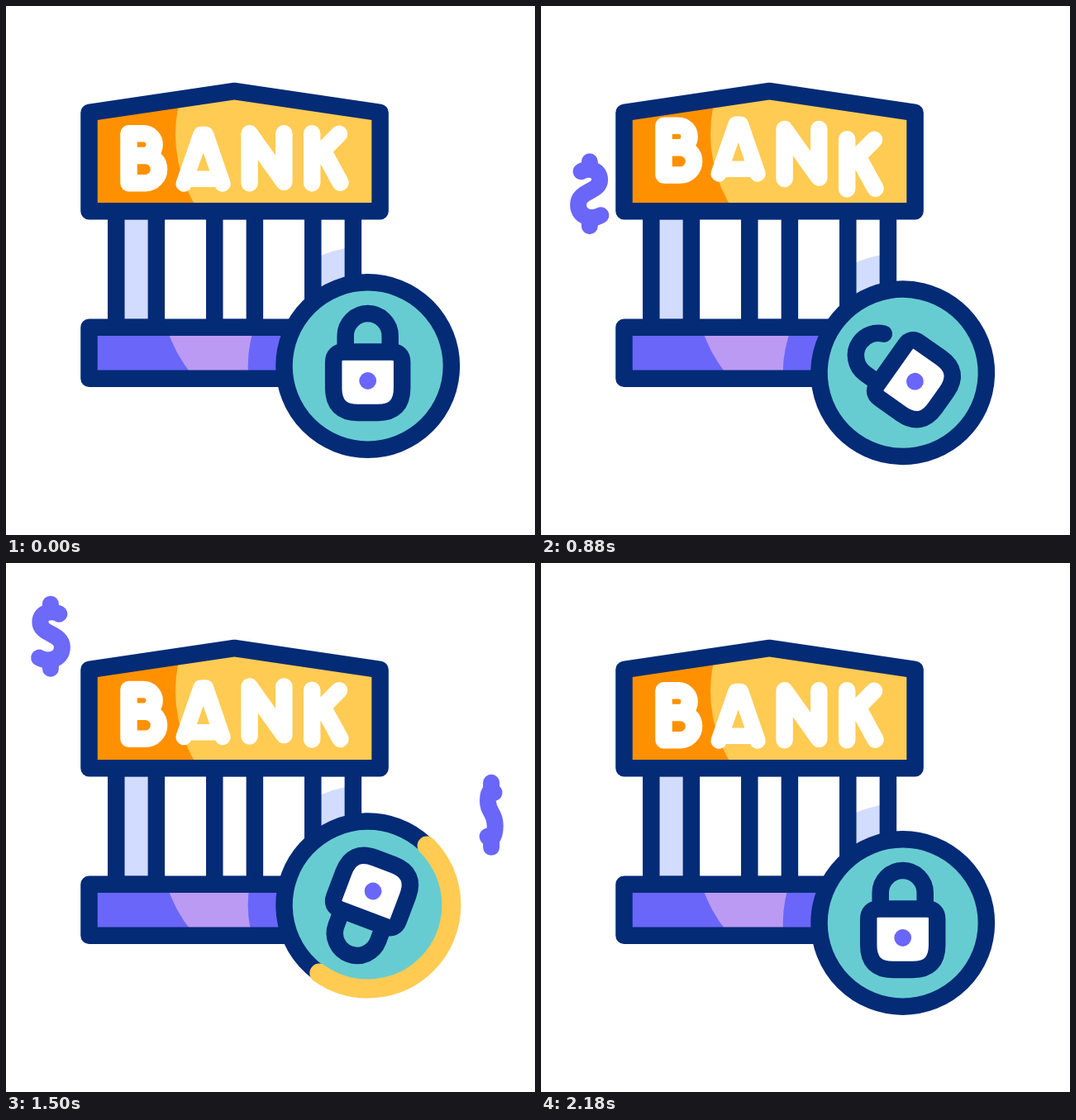
Write an HTML page with a canvas that moves like this. It is 640 px wide and 640 px high and loops after 2.4 s.

```html
<!DOCTYPE html>
<html lang="en">
<head>
<meta charset="utf-8">
<title>Bank lock</title>
<style>
html, body { margin: 0; width: 100%; height: 100%; overflow: hidden; background: #fff; }
canvas { display: block; width: 640px; height: 640px; }
</style>
</head>
<body>
<canvas id="stage" width="640" height="640" role="img" aria-label="BANK"></canvas>
<script>
const ctx = document.getElementById('stage').getContext('2d');
const LOOP = 2400, TAU = Math.PI * 2, RAD = Math.PI / 180, LINE = 20.5;
const NAVY = '#042b76', VIOLET = '#6a66f9', LILAC = '#bb9af3', PALE = '#d2dcfe',
  TEAL = '#67ccd1', YELLOW = '#ffcb52', ORANGE = '#ff9100', WHITE = '#fff';

const clamp = x => Math.min(1, Math.max(0, x));
const ease = x => 0.5 - 0.5 * Math.cos(Math.PI * clamp(x));
const ramp = (t, from, to) => ease((t - from) / (to - from));
const smooth = x => x * x * (3 - 2 * x);

function fill(path, color) {
  ctx.fillStyle = color;
  ctx.fill(path);
}

function stroke(path, color, width = LINE) {
  ctx.strokeStyle = color;
  ctx.lineWidth = width;
  ctx.stroke(path);
}

function disc(x, y, r) {
  const p = new Path2D();
  p.arc(x, y, r, 0, TAU);
  return p;
}

function box(x, y, w, h) {
  const p = new Path2D();
  p.rect(x, y, w, h);
  return p;
}

function clipped(path, draw) {
  ctx.save();
  ctx.clip(path);
  draw();
  ctx.restore();
}

const roof = new Path2D('M100.5 129L276.3 103L452.6 129V248.3H100.5Z');
const base = box(100.5, 388.7, 352, 62);
const body = new Path2D('M-29-17H29Q41.5-17 41.5-4.5V27Q41.5 56.5 12 56.5H-12Q-41.5 56.5-41.5 27V-4.5Q-41.5-17-29-17Z');
const letters = [
  'M148.5 154.3H166.3A13.3 13.3 0 0 1 166.3 181H148.5ZM148.5 181H168.5A16.6 16.6 0 0 1 168.5 214.2H148.5Z',
  'M215.2 215L236 155.5H241.5L262 215M222 209.3H256',
  'M294.6 214.2V154.3L336.3 212.8V154.3',
  'M370.2 154.3V214.2M403 154.8L371 187M384.5 177L404.5 213.6'
].map(d => new Path2D(d));

// Damped hop, started in turn for each letter
function hop(s) {
  const u = s - 120;
  return u < 0 ? 0 : -21.5 * Math.max(0, 1 - u / 1660) * Math.sin(Math.PI * u / 283);
}

function badgeY(t) {
  if (t < 740) return 435.5 + 40 * ramp(t, 0, 730);
  if (t < 1090) return 475.5 - 82 * ramp(t, 740, 1070);
  return 393.5 + 42 * ramp(t, 1095, 1925);
}

function badgeTurn(t) {
  if (t < 780) return -78 * ramp(t, 0, 780);
  if (t < 1080) return -78 * (1 - ramp(t, 780, 1055));
  return 360 * smooth(1 - Math.pow(1 - clamp((t - 1080) / 1080), 1.565));
}

function drawBank(t, cx, cy) {
  const halo = disc(cx, cy, 145);
  [133.3, 252.3, 371.3].forEach((x, i) => {
    const column = box(x, 248, 48.6, 141);
    fill(column, i ? WHITE : PALE);
    if (i === 2) clipped(column, () => fill(halo, PALE));
    stroke(column, NAVY);
  });

  fill(base, VIOLET);
  clipped(base, () => {
    fill(disc(354, 340, 167), LILAC);
    fill(halo, VIOLET);
  });
  stroke(base, NAVY);

  fill(roof, ORANGE);
  clipped(roof, () => fill(disc(372, 155, 167), YELLOW));
  stroke(roof, NAVY);

  letters.forEach((glyph, i) => {
    ctx.save();
    ctx.translate(0, hop(t - 80 * i));
    stroke(glyph, WHITE, i === 1 ? 19.5 : LINE);
    if (i === 1) fill(box(228, 201.5, 22, 15), WHITE);
    ctx.restore();
  });
}

function drawShackle(open) {
  const r = 27, leg = 19.5, total = 2 * leg + Math.PI * r;
  const left = total * (1 - open) - leg;
  const p = new Path2D();
  p.moveTo(-r, -17);
  p.lineTo(-r, -36.5);
  p.arc(0, -36.5, r, Math.PI, Math.PI + Math.min(Math.PI, left / r));
  const rest = left - Math.PI * r;
  if (rest > 0) p.lineTo(r, -36.5 + rest);
  stroke(p, NAVY);
}

function drawBadge(t, cx, cy) {
  ctx.save();
  ctx.translate(cx, cy);
  ctx.rotate(badgeTurn(t) * RAD);
  const ring = disc(0, 0, 101.2);
  fill(ring, TEAL);
  stroke(ring, NAVY);

  const head = ramp(t, 965, 1733), tail = ramp(t, 1212, 1971);
  if (head - tail > 0.001) {
    const arc = new Path2D();
    arc.arc(0, 0, 101.2, tail * TAU, head * TAU);
    stroke(arc, YELLOW, 23);
  }

  drawShackle(0.44 * (ramp(t, 0, 680) - ramp(t, 730, 1045)));
  fill(body, WHITE);
  stroke(body, NAVY);
  fill(disc(0, 18, 10.4), VIOLET);
  ctx.restore();
}

// Rising dollar sign that flips around its upright axis
function drawDollar(s, x, y) {
  if (s <= 0 || s >= 830) return;
  const turn = 108.7 * Math.pow(Math.max(0, 700 - s) / 440, 1.65);
  const k = Math.cos(turn * RAD);
  const sign = new Path2D();
  sign.moveTo(0, -39);
  sign.lineTo(0, -31);
  sign.moveTo(10.5 * k, -27);
  sign.bezierCurveTo(3 * k, -31, -12.5 * k, -31, -12.5 * k, -17);
  sign.bezierCurveTo(-12.5 * k, -2, 14 * k, -4, 14 * k, 13);
  sign.bezierCurveTo(14 * k, 30, -5 * k, 31, -13.8 * k, 26);
  sign.moveTo(0, 31);
  sign.lineTo(0, 39);
  ctx.save();
  ctx.globalAlpha = clamp(s / 60) * clamp((830 - s) / 132);
  ctx.translate(x, y - 0.2235 * s);
  stroke(sign, VIOLET, 20);
  ctx.restore();
}

function draw(t) {
  ctx.fillStyle = WHITE;
  ctx.fillRect(0, 0, 640, 640);
  ctx.lineCap = ctx.lineJoin = 'round';
  const cx = 437.7, cy = badgeY(t);
  drawBank(t, cx, cy);
  drawBadge(t, cx, cy);
  const s1 = t - 800, s2 = t - 1140;
  drawDollar(s1, 59.5 - 0.008 * s1, 245.3);
  drawDollar(s2, 589.3 - 0.006 * s2, 385.5);
}

function tick(now) {
  draw(now % LOOP);
  requestAnimationFrame(tick);
}
requestAnimationFrame(tick);
</script>
</body>
</html>
```
